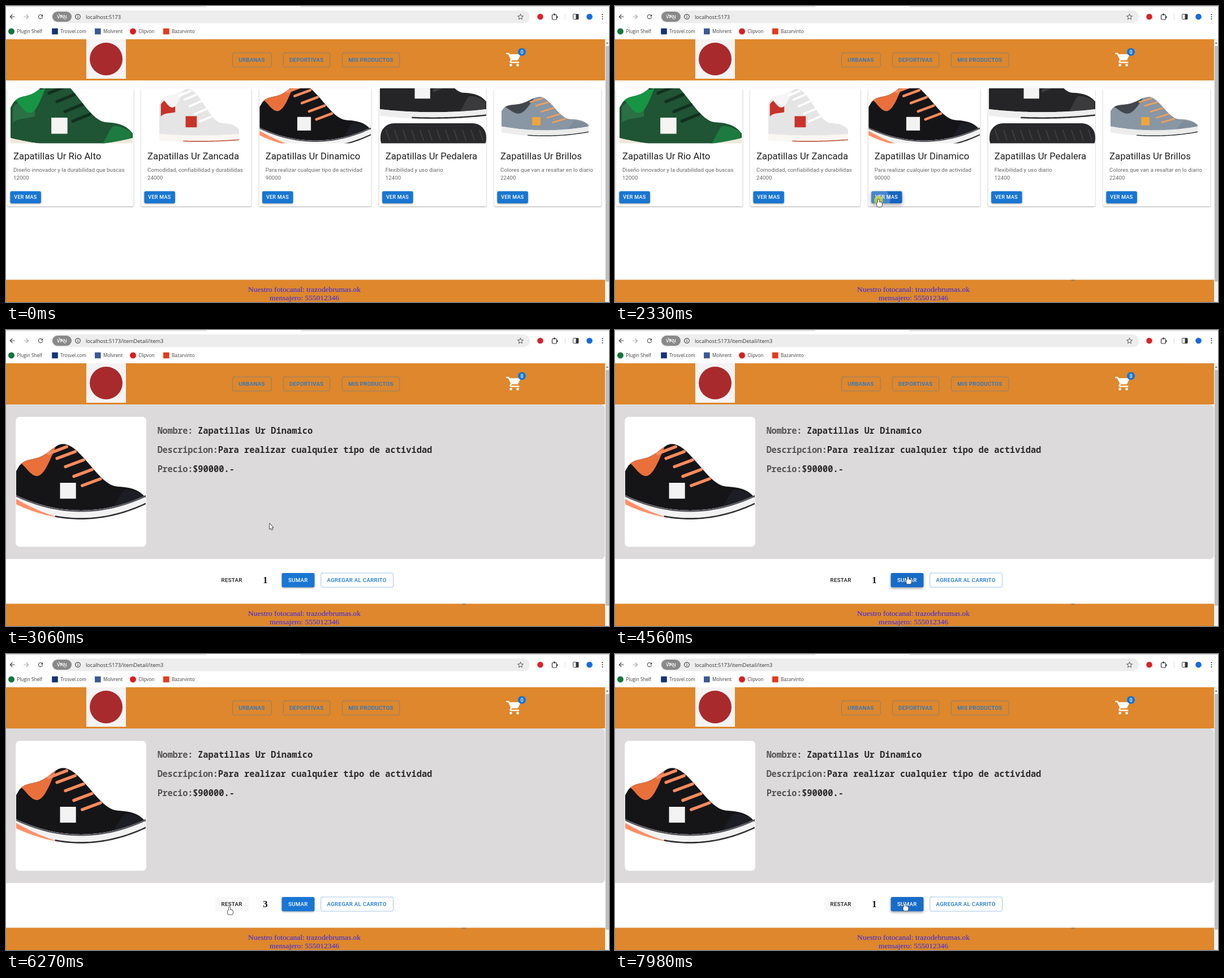
Recreate the animation shown at these times as an HTML page with a canvas. Size 1066 px wide and 525 px high, loop 8 s.

```html
<!DOCTYPE html>
<html lang="es">
<head>
<meta charset="utf-8">
<title>Tienda de zapatillas</title>
<style>
html, body { margin: 0; width: 100%; height: 100%; overflow: hidden; background: #fff; }
canvas { display: block; }
</style>
</head>
<body>
<canvas id="stage" width="1066" height="525"></canvas>
<script>
const ctx = document.getElementById('stage').getContext('2d');
const LOOP = 8000, NAVIGATE = 2400, LOADED = 3060, TICK = 70;
const BLUE = '#1976d2', ORANGE = '#de872c', INK = '#444';
const ROBOTO = 'Roboto, sans-serif', UI = '"Open Sans", sans-serif';
const SERIF = '"Liberation Serif", serif', MONO = '"Noto Sans Mono", monospace';

const clamp = v => Math.max(0, Math.min(1, v));
const smooth = v => clamp(v) ** 2 * (3 - 2 * clamp(v));

// ---------- drawing helpers ----------
function rect(x, y, w, h, fill) {
  ctx.fillStyle = fill;
  ctx.fillRect(x, y, w, h);
}

function roundRect(x, y, w, h, r, fill, stroke, width = 0.8) {
  ctx.beginPath();
  ctx.roundRect(x, y, w, h, r);
  if (fill) { ctx.fillStyle = fill; ctx.fill(); }
  if (stroke) { ctx.strokeStyle = stroke; ctx.lineWidth = width; ctx.stroke(); }
}

function circle(x, y, r, fill) {
  ctx.beginPath();
  ctx.arc(x, y, r, 0, Math.PI * 2);
  ctx.fillStyle = fill;
  ctx.fill();
}

function arc(x, y, r, from, to, color) {
  ctx.beginPath();
  ctx.arc(x, y, r, from, to);
  ctx.strokeStyle = color;
  ctx.lineWidth = 1.1;
  ctx.stroke();
}

function trace(points) {
  ctx.beginPath();
  for (let i = 0; i < points.length; i += 2) ctx.lineTo(points[i], points[i + 1]);
}

function poly(points, fill) {
  trace(points);
  ctx.fillStyle = fill;
  ctx.fill();
}

function line(points, color, width) {
  trace(points);
  ctx.strokeStyle = color;
  ctx.lineWidth = width;
  ctx.lineCap = ctx.lineJoin = 'round';
  ctx.stroke();
}

function text(str, x, y, font, color, { align = 'left', spacing = 0 } = {}) {
  ctx.font = font;
  ctx.fillStyle = color;
  ctx.textAlign = align;
  ctx.letterSpacing = spacing + 'px';
  ctx.fillText(str, x, y);
}

function clipped(x, y, w, h, r, draw) {
  ctx.save();
  ctx.beginPath();
  ctx.roundRect(x, y, w, h, r);
  ctx.clip();
  draw();
  ctx.restore();
}

function withShadow(blur, dy, alpha, draw) {
  ctx.save();
  ctx.shadowColor = `rgba(0,0,0,${alpha})`;
  ctx.shadowBlur = blur;
  ctx.shadowOffsetY = dy;
  draw();
  ctx.restore();
}

// ---------- pointer and buttons ----------
const buttons = {
  more: { x: 453, y: 328.6, w: 54.5, h: 21.3, page: 'list' },
  subtract: { x: 370, y: 431, w: 59, h: 25.2, page: 'detail', step: -1 },
  add: { x: 487.6, y: 431, w: 57.8, h: 25.2, page: 'detail', step: 1 }
};
const moves = [
  { start: 240, end: 450, x: 806, y: 478 },
  { start: 710, end: 910, x: 580, y: 430 },
  { start: 1110, end: 1850, x: 466, y: 343.5 },
  { start: 3740, end: 4490, x: 518, y: 438 },
  { start: 5640, end: 6270, x: 395, y: 449.5 },
  { start: 6340, end: 6410, x: 381, y: 442 },
  { start: 6540, end: 6810, x: 376, y: 440 },
  { start: 7630, end: 7850, x: 488.5, y: 445 },
  { start: 7920, end: 7980, x: 512.5, y: 443 }
];
const clicks = [2120, 4900, 5250, 7140, 7420];

const pageAt = t => t < NAVIGATE ? 'list' : 'detail';

function pointerAt(t) {
  let x = 1060, y = 526;
  for (const move of moves) {
    if (t < move.start) break;
    const span = move.end - move.start, steps = Math.round(span / TICK) + 1;
    const step = Math.floor((t - move.start) / span * (steps - 1) + 1e-6) + 1;
    const u = Math.min(1, step / steps);
    const p = steps > 5 ? u * (3 - u) / 2 : u;
    x += (move.x - x) * p;
    y += (move.y - y) * p;
  }
  return { x, y };
}

function buttonAt(t) {
  const p = pointerAt(t);
  return Object.keys(buttons).find(name => {
    const b = buttons[name];
    return b.page === pageAt(t) && p.x > b.x && p.x < b.x + b.w && p.y > b.y && p.y < b.y + b.h;
  });
}

// Share of the last 250 ms that the pointer spent on the button.
function hoverAmount(name, t) {
  const samples = 25;
  let hits = 0;
  for (let i = 0; i < samples; i++) hits += buttonAt(t - i * 10) === name;
  return hits / samples;
}

const quantity = t => clicks.reduce(
  (n, at) => t >= at + TICK ? n + (buttons[buttonAt(at)].step || 0) : n, 1);

function ripples(name, t, color) {
  const { x, y, w, h } = buttons[name];
  for (const at of clicks) {
    const age = t - at;
    if (age < 0 || age > 600 || buttonAt(at) !== name) continue;
    const p = pointerAt(at);
    clipped(x, y, w, h, 2.8, () => {
      ctx.globalAlpha = 0.22 * (1 - clamp((age - 250) / 350));
      circle(p.x, p.y, w * (0.1 + 0.72 * clamp(age / 550)), color);
    });
  }
}

function hand(color, outline) {
  roundRect(-1.2, -0.4, 2.4, 9, 1.2, color, outline, 1.5);
  roundRect(-3, 4.6, 9, 8, 2.8, color, outline, 1.5);
}

function pointer(t) {
  if (t < moves[0].start) return;
  const { x, y } = pointerAt(t);
  const page = pageAt(t);
  if (clicks.some(at => t >= at && t < at + 280 && pageAt(at) === page))
    circle(x, y + 1, 8, 'rgba(206,216,50,.75)');
  ctx.save();
  ctx.translate(x, y);
  if (buttonAt(t)) {
    hand(null, '#222');
    hand('#fff');
  } else {
    const arrow = [0, 0, 0, 9.5, 2.2, 7.5, 3.7, 11, 5.2, 10.4, 3.7, 7, 6.6, 7, 0, 0];
    line(arrow, '#222', 1.5);
    poly(arrow, '#fff');
  }
  ctx.restore();
}

// ---------- browser frame ----------
function browser(url) {
  rect(0, 0, 354, 2, '#e2e3e4');
  rect(521, 0, 545, 2, '#e2e3e4');
  for (const [x, dir, color] of [[11, -1, INK], [36, 1, '#aaa']]) {
    const tip = x + dir * 3.6;
    line([x - dir * 4, 19, tip, 19], color, 1.2);
    line([x, 15.5, tip, 19, x, 22.5], color, 1.2);
  }
  arc(61, 19, 3.6, 0.3, 5.5, INK);
  poly([65.2, 14.8, 65.2, 18.4, 61.6, 18.4], INK);

  roundRect(81, 8, 845, 22.5, 11.2, '#ededee');
  roundRect(82, 10, 34, 18, 9, '#898989');
  text('VPN', 99, 22.4, `600 8.8px ${UI}`, '#fff', { align: 'center' });
  line([93, 14, 105, 24], '#fff', 1);
  arc(127, 19, 4.3, 0, 7, '#333');
  rect(126.5, 18.3, 1.1, 3, '#333');
  rect(126.5, 16.3, 1.1, 1.1, '#333');
  text(url, 141, 22.5, `9.2px ${UI}`, '#333');

  const star = [];
  for (let i = 0; i <= 10; i++) {
    const a = i * Math.PI / 5 - Math.PI / 2, r = i % 2 ? 2.3 : 5.2;
    star.push(909.5 + r * Math.cos(a), 19.5 + r * Math.sin(a));
  }
  line(star, INK, 0.9);
  circle(944.5, 19, 5.3, '#d8232a');
  roundRect(965.5, 15.5, 8, 8.5, 1.5, null, '#333', 1.2);
  circle(969.5, 15, 1.7, INK);
  circle(974.2, 19.7, 1.7, INK);
  rect(988, 14, 1, 10, '#d5dbe5');
  roundRect(1002.5, 14.5, 9.5, 9, 1, null, '#222');
  rect(1007.5, 14.5, 4.5, 9, '#333');
  circle(1031.5, 19, 5.3, '#1769e0');
  for (let i = -1; i <= 1; i++) circle(1054.5, 19 + i * 3.8, 1.1, INK);

  const bookmarks = [
    ['Plugin Shelf', 9.5, '#16743c', true], ['Trosvel.com', 86.5, '#14337c'], ['Molvrent', 162.3, '#3b5998'],
    ['Clipvon', 224.5, '#d91f1f', true], ['Bazarvinto', 283.3, '#e43a1c']
  ];
  for (const [name, x, color, round] of bookmarks) {
    if (round) circle(x, 45, 5.5, color);
    else rect(x - 5.3, 39.7, 10.6, 10.6, color);
    text(name, x + 9.7, 48.1, `8.2px ${UI}`, '#3c3c3c');
  }
}

// ---------- page frame ----------
const buttonFont = `500 9.72px ${ROBOTO}`;

function outlined(label, x, y, w, h) {
  roundRect(x, y, w, h, 2.8, null, 'rgba(25,118,210,.52)');
  text(label, x + 10.8, y + 16.2, buttonFont, BLUE, { spacing: 0.28 });
}

function cart() {
  ctx.save();
  ctx.translate(884, 80.6);
  ctx.scale(1.21, 1.21);
  line([1, 3, 3.7, 3, 8, 12, 6.1, 15.2, 7, 16, 18.4, 16], '#fff', 2);
  poly([4.6, 4, 21.6, 4, 17.3, 13, 8.6, 13], '#fff');
  circle(7, 20, 2, '#fff');
  circle(17, 20, 2, '#fff');
  ctx.restore();
  circle(912, 81.5, 7, BLUE);
  text('0', 912, 84.5, `500 8.3px ${ROBOTO}`, '#fff', { align: 'center' });
}

function pageFrame(t) {
  rect(0, 59, 1059, 73, ORANGE);
  rect(142, 59, 70, 70, '#f5f3f3');
  circle(177, 94, 29, '#a92a2c');
  outlined('URBANAS', 400.5, 83.2, 68.8, 25);
  outlined('DEPORTIVAS', 490.3, 83.2, 82.4, 25);
  outlined('MIS PRODUCTOS', 594.4, 83.2, 101.4, 25);
  cart();

  rect(0, 485.5, 1059, 39.5, ORANGE);
  const lines = ['Nuestro fotocanal: trazodebrumas.ok', 'mensajero: 555012346'];
  lines.forEach((str, i) => text(str, 527.5, 507 + i * 15, `13.45px ${SERIF}`, '#3524ee', { align: 'center' }));
  if (t >= moves[1].start) roundRect(806, 485.6, 7, 2, 1, 'rgba(130,120,110,.75)');

  rect(1059, 59, 7, 466, '#f2f2f2');
  rect(1060, 71, 6, 418, '#bfbfbf');
  poly([1060.5, 67, 1065, 67, 1062.7, 64], '#777');
}

// ---------- product pictures ----------
// A side view built from bands between height curves; u runs heel to toe, heights run 0 to 1.
function shoe(x, y, w, h, look) {
  const { peak = 0.36, heel = 0.8, toe = 0.44, curve = 0.1, thick = 0.12 } = look;
  const px = u => x + u * w, py = v => y + (1 - v) * h;
  const ground = u => curve * (2 * u - 1) ** 2;
  const welt = u => ground(u) + thick;
  const top = u => {
    const height = u < peak
      ? heel + (1 - heel) * smooth(u / peak) ** 3
      : 1 - (1 - toe) * smooth((u - peak) / (0.78 - peak));
    return height * (1 - 0.35 * u ** 14 - 0.2 * (1 - u) ** 24);
  };
  const band = (from, to, low, high, color) => {
    if (!color) return;
    const points = [], n = 40;
    for (let i = 0; i <= 2 * n + 1; i++) {
      const u = from + (to - from) * (i <= n ? i : 2 * n + 1 - i) / n;
      points.push(px(u), py((i <= n ? high : low)(u)));
    }
    poly(points, color);
  };

  band(0, 1, welt, top, look.body);
  band(0.74, 0.99, welt, u => welt(u) + (top(u) - welt(u)) * 0.85 * smooth((u - 0.74) * 9), look.cap);
  band(0.02, 0.2, u => top(u) * 0.62, u => top(u) * 0.92, look.patch);
  const rim = peak * 0.85;
  band(0.04, rim, u => top(u) - 0.24 * Math.sin(Math.PI * (u - 0.04) / (rim - 0.04)), top, look.lining);
  band(0, 1, ground, u => Math.min(welt(u), top(u)), look.sole);
  band(0, 1, u => welt(u) - 0.02, welt, look.seam);
  band(0, 0.34, ground, u => ground(u) + thick * 0.6 * (1 - u / 0.34), look.heelSole);
  band(0.3, 1, ground, u => ground(u) + 0.02, look.tread);
  for (let i = 0; i < 5; i++) {
    const u = peak + 0.03 + i * 0.065, v = top(u) - 0.03;
    line([px(u), py(v), px(u - 0.14), py(v - 0.09)], look.lace, h * 0.04);
  }
  const side = h * 0.21;
  rect(px(0.4) - side / 2, py(0.38) - side / 2, side, side, look.mark);
}

const looks = {
  green: { body: '#1f5434', cap: '#1d7a40', patch: '#2a7044', lining: '#179544', sole: '#eee8da', lace: '#12301f',
    mark: '#f5f5f2', heel: 0.77, toe: 0.43 },
  white: { body: '#e6e5e5', patch: '#c73328', lining: '#f6f4f4', sole: '#faf6f1', lace: '#fff', tread: '#c66a55',
    mark: '#c8332a', heel: 0.88, toe: 0.36, curve: 0.03 },
  black: { body: '#151518', cap: '#1d1d26', lining: '#e9703a', sole: '#f2f2f2', seam: '#55565c', heelSole: '#ff9069',
    tread: '#303034', lace: '#ff8b5e', mark: '#f2f2f2', curve: 0.2 },
  cycling: { body: '#252527', cap: '#3a3a3c', lining: '#929399', sole: '#eee', tread: '#353535', lace: '#3d3d40',
    mark: '#f4f4f4', toe: 0.36, curve: 0.04, thick: 0.09 },
  grey: { body: '#8996a4', cap: '#7f8c9a', lining: '#42474e', sole: '#ececec', tread: '#2c2e31', lace: '#f0a05c',
    mark: '#f0a53a', peak: 0.44, curve: 0.1, thick: 0.15 }
};

function outsole() {
  roundRect(662, 208, 187, 52, 24, '#29292b');
  for (let i = 0; i < 12; i++) line([672 + i * 15, 220, 678 + i * 15, 238], '#3e3e41', 2);
}

// ---------- pages ----------
const products = [
  { x: 2, w: 223.5, name: 'Zapatillas Ur Rio Alto', info: 'Diseño innovador y la durabilidad que buscas', price: 12000,
    draw: () => shoe(8, 128, 216, 136, looks.green) },
  { x: 239, w: 194.5, name: 'Zapatillas Ur Zancada', info: 'Comodidad, confiabilidad y durabilidas', price: 24000,
    draw: () => shoe(271, 147, 141, 94, looks.white) },
  { x: 447.6, w: 198, name: 'Zapatillas Ur Dinamico', info: 'Para realizar cualquier tipo de actividad', price: 90000,
    draw: () => shoe(448.4, 137.5, 196.5, 115, looks.black) },
  { x: 659.7, w: 189.2, name: 'Zapatillas Ur Pedalera', info: 'Flexibilidad y uso diario', price: 12400,
    draw: () => { shoe(661, 70, 188, 130, looks.cycling); outsole(); } },
  { x: 863, w: 189.2, name: 'Zapatillas Ur Brillos', info: 'Colores que van a resaltar en lo diario', price: 22400,
    draw: () => shoe(876, 161, 154, 70, looks.grey) }
];
const chosen = products[2];

function contained({ x, y, w, h }, hover = 0) {
  const color = `rgb(${25 - 4 * hover},${118 - 17 * hover},${210 - 18 * hover})`;
  withShadow(2.8 + 3.5 * hover, 1.2 + 1.4 * hover, 0.38, () => roundRect(x, y, w, h, 2.8, color));
}

function listPage(t) {
  for (const item of products) {
    const { x, w } = item, left = x + 11.1;
    withShadow(2.4, 0.9, 0.35, () => roundRect(x, 146, w, 209.3, 2.8, '#fff'));
    clipped(x, 146, w, 97.5, [2.8, 2.8, 0, 0], item.draw);
    text(item.name, left, 272, `16.66px ${ROBOTO}`, '#212121');
    text(item.info, left, 294.4, `9.72px ${ROBOTO}`, '#666', { spacing: 0.04 });
    text(String(item.price), left, 308.3, `9.72px ${ROBOTO}`, '#666', { spacing: 0.04 });
    contained({ ...buttons.more, x: x + 5.4 }, item === chosen ? hoverAmount('more', t) : 0);
    text('VER MAS', x + 12.3, 342.4, `500 9.02px ${ROBOTO}`, '#fff', { spacing: 0.26 });
  }
  ripples('more', t, '#fff');
}

function field(label, value, y, gap = 0) {
  const font = `bold 15.4px ${MONO}`, left = 267.7;
  text(label, left, y, font, '#565556', { spacing: -0.32 });
  text(value, left + (label.length + gap) * 8.92, y, font, '#2b2a2b');
}

function detailPage(t) {
  const loaded = t >= LOADED, grow = loaded ? 114.5 : 0;
  roundRect(0, 132, 1058.7, 159.7 + grow, [0, 7, 7, 0], '#dcdadb');
  field('Nombre:', loaded ? chosen.name : '', 184, 1);
  field('Descripcion:', loaded ? chosen.info : '', 218);
  field('Precio:', `$${loaded ? chosen.price : ''}.-`, 252);
  if (loaded) {
    roundRect(17.3, 154, 230.7, 230.5, 7, '#fff');
    shoe(18, 202, 229, 134, looks.black);
  }

  const { add, subtract } = buttons;
  const y = 316.5 + grow, base = y + 16.1;
  const tint = `rgba(0,0,0,${0.032 * hoverAmount('subtract', t)})`;
  roundRect(subtract.x, y, subtract.w, subtract.h, 2.8, tint);
  ripples('subtract', t, '#000');
  contained({ ...add, y }, hoverAmount('add', t));
  ripples('add', t, '#fff');
  text('RESTAR', 380.6, base, buttonFont, '#1a1a1a', { spacing: 0.28 });
  text(String(quantity(t)), 458.3, y + 18.3, `bold 16.7px ${SERIF}`, '#111', { align: 'center' });
  text('SUMAR', 498.9, base, buttonFont, '#fff', { spacing: 0.28 });
  outlined('AGREGAR AL CARRITO', 556.7, y, 128, 25.2);
}

function frame(now) {
  const t = now % LOOP, detail = pageAt(t) === 'detail';
  rect(0, 0, 1066, 525, '#fff');
  browser('localhost:5173' + (detail ? '/itemDetail/item3' : ''));
  pageFrame(t);
  (detail ? detailPage : listPage)(t);
  pointer(t);
  requestAnimationFrame(frame);
}
requestAnimationFrame(frame);
</script>
</body>
</html>
```
